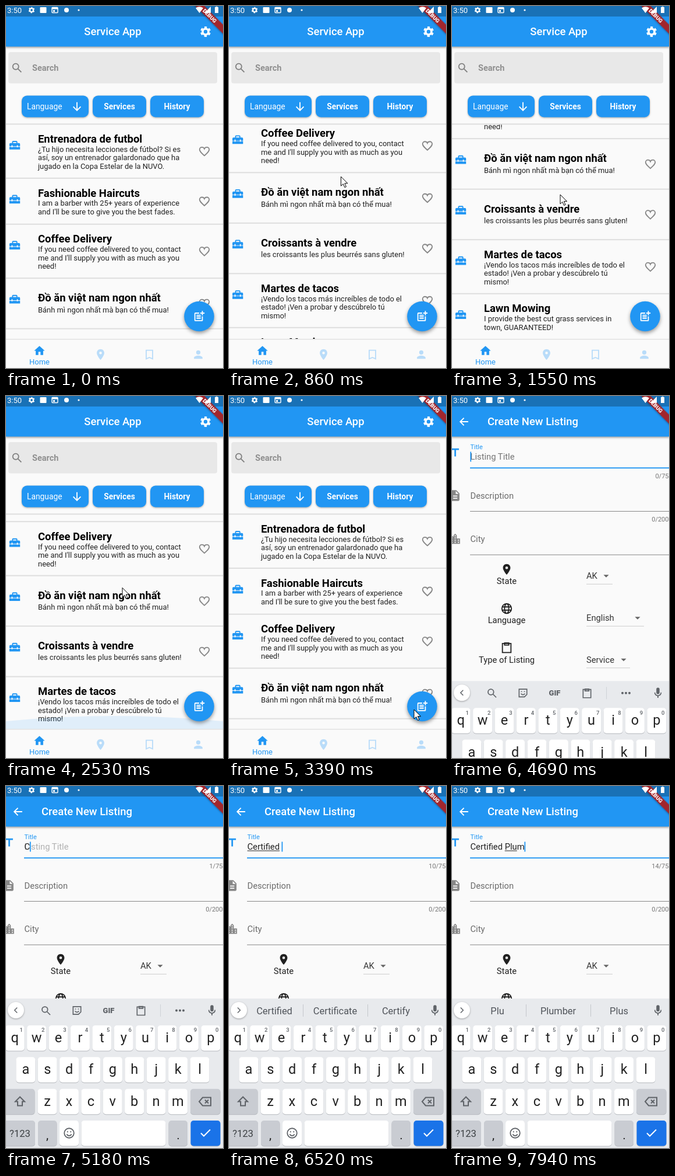
Write an HTML page that moves like this. It is 373 px wide and 620 px high and loops after 8 s.

```html
<!DOCTYPE html>
<html lang="en">
<head>
<meta charset="utf-8">
<title>Service App</title>
<style>
  html, body { margin: 0; width: 100%; height: 100%; overflow: hidden; background: #fafafa; }
  svg { display: block; width: 100vw; height: 100vh; }
  text { font-family: Roboto, sans-serif; white-space: pre; }
  .raised { filter: drop-shadow(0 1.5px 1.5px #0005); }
  .bar { filter: drop-shadow(0 2px 1.5px #0005); }
  .floating { filter: drop-shadow(0 3px 3px #0006); }
</style>
</head>
<body>
<svg id="stage" viewBox="0 0 373 620"></svg>
<script>
const LOOP = 8000, BLUE = '#2196f3', GREY = '#888', INK = '#212121', MAX_SCROLL = 239;

const FILLED = {
  home: 'M10 20v-6h4v6h5v-8h3L12 3 2 12h3v8z',
  place: 'M12 2C8.1 2 5 5.1 5 9c0 5.2 7 13 7 13s7-7.8 7-13c0-3.9-3.1-7-7-7zm0 9.5a2.5 2.5 0 0 1 0-5 2.5 2.5 0 0 1 0 5z',
  person: 'M12 12a4 4 0 1 0 0-8 4 4 0 0 0 0 8zM4 20v-2c0-2.7 5.3-4 8-4s8 1.3 8 4v2z',
  title: 'M5 4v3h5.5v12h3V7H19V4z',
  doc: 'M14 2H6a2 2 0 0 0-2 2v16a2 2 0 0 0 2 2h12a2 2 0 0 0 2-2V8zM16 18H8v-2h8zM16 14H8v-2h8zM13 9V3.5L18.5 9z',
  city: 'M15 11V5l-3-3-3 3v2H3v14h18V11zM7 19H5v-2h2zM7 15H5v-2h2zM7 11H5V9h2zM13 19h-2v-2h2zm0-4h-2v-2h2zm0-4h-2V9h2zm0-4h-2V5h2zm6 12h-2v-2h2zm0-4h-2v-2h2z',
  toolbox: 'M18 16h-2v-1H8v1H6v-1H2v5h20v-5h-4zM20 8h-3V6a2 2 0 0 0-2-2H9a2 2 0 0 0-2 2v2H4a2 2 0 0 0-2 2v4h4v-2h2v2h8v-2h2v2h4v-4a2 2 0 0 0-2-2zM15 8H9V6h6z',
  post: 'M17 19H5V7h7V5H5a2 2 0 0 0-2 2v12a2 2 0 0 0 2 2h12a2 2 0 0 0 2-2v-7h-2zM19 2h-2v3h-3v2h3v3h2V7h3V5h-3zM7 9h8v2H7zM7 12h8v2H7zM7 15h8v2H7z',
  mic: 'M12 14a3 3 0 0 0 3-3V5a3 3 0 0 0-6 0v6a3 3 0 0 0 3 3zM17 11a5 5 0 0 1-10 0H5.3a6.7 6.7 0 0 0 5.7 6.7V21h2v-3.3A6.7 6.7 0 0 0 18.7 11z',
  caret: 'M7 10l5 5 5-5z'
};
const STROKED = {
  heart: 'M12 19.9C6 14.5 3 11.8 3 8.5 3 6 5 4 7.5 4 9.4 4 11.3 5.2 12 7 12.7 5.2 14.6 4 16.5 4 19 4 21 6 21 8.5 21 11.8 18 14.5 12 19.9Z',
  search: 'M15 9.5a5.5 5.5 0 1 1-11 0a5.5 5.5 0 1 1 11 0M14 14l6 6',
  down: 'M12 4v15M5 12.5l7 7 7-7',
  back: 'M20 12H5M12 5l-7 7 7 7',
  bookmark: 'M6 4h12v16l-6-2.6L6 20z',
  globe: 'M21 12a9 9 0 1 1-18 0a9 9 0 1 1 18 0M16 12c0 5-2 9-4 9s-4-4-4-9 2-9 4-9 4 4 4 9M4 9h16M4 15h16',
  clipboard: 'M4 4h16v17H4zM8 3h8v4H8z',
  shift: 'M12 4l-8 8h4v7h8v-7h4z',
  backspace: 'M8 5h14v14H8l-6-7zM12 9l6 6M18 9l-6 6',
  check: 'M4 12l5 5L20 6',
  smile: 'M21 12a9 9 0 1 1-18 0a9 9 0 1 1 18 0M7.5 14a5 5 0 0 0 9 0M9 8.5v2M15 8.5v2',
  sticker: 'M4 4h16v11l-5 5H4zM8 13a4.5 4.5 0 0 0 8 0M9 8v2M15 8v2',
  left: 'M15 6l-6 6 6 6',
  right: 'M9 6l6 6-6 6'
};

// Text is placed by the middle of its capitals.
const text = (x, cy, size, str, fill = INK, weight = 400, anchor = 'start', extra = '') =>
  `<text x="${x}" y="${cy + size * .36}" font-size="${size}" fill="${fill}" font-weight="${weight}" text-anchor="${anchor}" ${extra}>${str}</text>`;
const rect = (x, y, w, h, fill, r = 0, extra = '') =>
  `<rect x="${x}" y="${y}" width="${w}" height="${h}" rx="${r}" fill="${fill}" ${extra}/>`;
const circle = (x, y, r, fill, extra = '') => `<circle cx="${x}" cy="${y}" r="${r}" fill="${fill}" ${extra}/>`;
const group = (id, body) => `<g id="${id}">${body}</g>`;
const icon = (name, cx, cy, color, size = 22, id = '') => {
  const paint = FILLED[name]
    ? `fill="${color}" fill-rule="evenodd"`
    : `fill="none" stroke="${color}" stroke-width="2"`;
  return `<path id="${id}" transform="translate(${cx - size / 2} ${cy - size / 2}) scale(${size / 24})" d="${FILLED[name] || STROKED[name]}" ${paint}/>`;
};
const gear = (cx, cy, size) => `<g transform="translate(${cx} ${cy}) rotate(-90) scale(${size / 24})" fill="none" stroke="#fff">
  <circle r="5.5" stroke-width="4"/><circle r="8" stroke-width="3.6" stroke-dasharray="4.6 3.778" stroke-dashoffset="2.3"/></g>`;
const appBar = () => rect(0, 0, 373, 69.5, BLUE, 0, 'class="bar"');

const LISTINGS = [
  ['Entrenadora de futbol', '¿Tu hijo necesita lecciones de fútbol? Si es', 'así, soy un entrenador galardonado que ha', 'jugado en la Copa Estelar de la NUVO.'],
  ['Fashionable Haircuts', 'I am a barber with 25+ years of experience', "and I'll be sure to give you the best fades."],
  ['Coffee Delivery', 'If you need coffee delivered to you, contact', "me and I'll supply you with as much as you", 'need!'],
  ['Đồ ăn việt nam ngon nhất', 'Bánh mì ngon nhất mà bạn có thể mua!'],
  ['Croissants à vendre', 'les croissants les plus beurrés sans gluten!'],
  ['Martes de tacos', '¡Vendo los tacos más increíbles de todo el', 'estado! ¡Ven a probar y descúbrelo tú', 'mismo!'],
  ['Lawn Mowing', 'I provide the best cut grass services in', 'town, GUARANTEED!']
];

function listings() {
  let top = 202.4;
  return LISTINGS.map(([title, ...lines]) => {
    const height = [86.5, 78.8, 92.5][lines.length - 1];
    const titleY = top + (lines.length === 1 ? 33.5 : 25);
    const bodyY = titleY + (lines.length === 1 ? 20.2 : 17.8);
    const item = icon('toolbox', 15, top + 36, BLUE) +
      text(55, titleY, 18.45, title, '#000', 700) +
      lines.map((line, i) => text(55, bodyY + i * 14.6, 12.93, line)).join('') +
      icon('heart', 341, top + height / 2 + .5, GREY) +
      rect(0, top + height - 1, 373, 2, '#dedede');
    top += height;
    return item;
  }).join('');
}

const button = (x, w, body) => rect(x, 153.5, w, 37, BLUE, 9, 'class="raised"') + body;

function home() {
  const pale = '#b9dcf9';
  return rect(0, 0, 373, 620, '#fafafa') +
    group('list', listings()) +
    '<path id="glow" d="M0 557Q186 539 373 557V571H0Z" fill="#2196f3"/>' +
    rect(0, 0, 373, 203, '#fafafa') + rect(0, 201.3, 373, 2, '#dedede') +
    appBar() + text(183.5, 43.6, 18.45, 'Service App', '#fff', 500, 'middle') + gear(343, 44, 22) +
    rect(4, 79, 359, 53.5, '#e8e8e8', 4) + icon('search', 19, 106, '#808080') +
    text(45, 106, 14.5, 'Search', '#8f8f8f', 700) +
    button(27, 115, text(36, 172, 13.8, 'Language', '#fff') + icon('down', 122, 172, '#fff')) +
    button(149, 92, text(195, 172, 13.8, 'Services', '#fff', 700, 'middle')) +
    button(248, 92, text(294, 172, 13.8, 'History', '#fff', 700, 'middle')) +
    rect(0, 570, 373, 2, '#e2e2e2') + rect(0, 571.5, 373, 49, '#fafafa') +
    icon('home', 57.5, 590.5, BLUE) + text(57.5, 609, 12.93, 'Home', BLUE, 400, 'middle') +
    icon('place', 162.5, 597, pale) + icon('bookmark', 246.5, 597, pale) + icon('person', 330.5, 597, pale) +
    circle(332, 531.5, 25.8, BLUE, 'class="floating"') + circle(332, 531.5, 25.8, '#fff', 'id="ripple"') +
    icon('post', 332, 531.5, '#fff');
}

const counter = (y, str, id) => text(372.5, y, 11, str, '#757575', 400, 'end', `id="${id}"`);
const picker = (iconName, label, labelY, value, valueY, width) =>
  icon(iconName, 94, labelY - 20, INK) + text(94, labelY, 14.75, label, INK, 400, 'middle') +
  text(231, valueY, 14.75, value, '#333') + icon('caret', 231 + width - 11, valueY, '#666') +
  rect(231, valueY + 13.7, width, 1, '#ccc');

function form() {
  return rect(0, 0, 373, 620, '#fafafa') + appBar() +
    icon('back', 20.5, 44, '#fff') + text(61, 43.6, 18.45, 'Create New Listing', '#fff', 500) +
    icon('title', 5.5, 97, GREY, 22, 'titleIcon') + icon('doc', 5.5, 170.5, GREY) + icon('city', 5.5, 245, GREY) +
    '<text id="label" x="31.5">Title</text>' +
    text(31.5, 104, 14.75, 'Listing Title', '#757575', 400, 'start', 'id="hint"') +
    text(31.5, 104, 14.75, '', INK, 400, 'start', 'id="typed"') +
    rect(0, 110.5, 0, 1, INK, 0, 'id="composing"') + rect(0, 95.5, 1.8, 17, BLUE, 0, 'id="textCaret"') +
    rect(31, 123, 342, 1, GREY, 0, 'id="titleLine"') + counter(137, '0/75', 'titleCount') +
    text(31.5, 171, 14.75, 'Description', '#6b6b6b') + rect(31, 197, 342, 1, GREY) + counter(211, '0/200', 'bodyCount') +
    text(31.5, 245, 14.75, 'City', '#6b6b6b') + rect(31, 271.5, 342, 1, GREY) +
    picker('place', 'State', 317, 'AK', 308, 45) +
    picker('globe', 'Language', 384, 'English', 380, 99) +
    picker('clipboard', 'Type of Listing', 451.2, 'Service', 451.5, 75) +
    rect(129, 502, 110, 46, '#fff', 2, 'class="raised"') +
    text(184, 525, 14.75, 'Add Listing!', BLUE, 500, 'middle');
}

function keyboard() {
  const soft = '#5f6368', dim = '#c9ccd2';
  const key = (x, y, w, fill = '#fff') => rect(x, y + 1, w, 43.5, '#b5b8bd', 5) + rect(x, y, w, 43.5, fill, 5);
  const row = (letters, x0, y) => [...letters].map((ch, i) => {
    const x = x0 + i * 37.4;
    return key(x - 16.5, y, 33) + text(x, y + 20.7, 23.5, ch, INK, 400, 'middle') +
      (y === 410 ? text(x + 11, 418, 9.5, (i + 1) % 10, soft, 500, 'middle') : '');
  }).join('');
  const tools = icon('left', 17, 384, soft, 18) + icon('search', 69, 385, soft, 21) + icon('sticker', 122, 384.5, soft, 20) +
    text(176.5, 384.5, 13, 'GIF', soft, 900, 'middle') + icon('clipboard', 232, 385, soft, 20) +
    rect(265, 374, 1, 21, '#cfd2d6') + [293, 299, 305].map(x => circle(x, 384.5, 2, soft)).join('');
  const words = icon('right', 17, 384, soft, 18) + rect(127, 374, 1, 21, '#c4c7cb') + rect(238, 374, 1, 21, '#c4c7cb') +
    [78, 182.5, 287].map(x => text(x, 385, 16.4, '', '#50545a', 400, 'middle', 'class="word"')).join('');
  return rect(0, 364, 373, 256, '#e8eaed') + circle(17, 384, 14, '#fff', 'class="raised"') +
    group('tools', tools) + group('words', words) + icon('mic', 354, 384.5, soft, 22) +
    row('qwertyuiop', 15.2, 410) + row('asdfghjkl', 33.8, 464.3) + row('zxcvbnm', 71, 518.7) +
    key(-4, 518.7, 53.5, dim) + icon('shift', 24, 540.5, soft, 24) +
    key(317, 518.7, 51.5, dim) + icon('backspace', 342, 540.5, soft, 24) +
    key(-4, 573, 54, dim) + text(24, 595, 16.6, '?123', '#3c4043', 400, 'middle') +
    key(55, 573, 32.5, dim) + text(71, 597, 21, ',', INK, 400, 'middle') +
    key(92, 573, 33) + icon('smile', 108.5, 594.5, soft, 22) +
    key(129.5, 573, 145) +
    key(279.5, 573, 32.5, dim) + text(296, 597, 21, '.', INK, 400, 'middle') +
    key(317.5, 573, 51, '#1a73e8') + icon('check', 343, 594.5, '#fff', 24);
}

function statusBar() {
  return rect(0, 0, 373, 18, '#1971b6') +
    `<g transform="translate(370 -3) rotate(45)">${rect(-60, 22.5, 120, 11, '#a3262c', 0, 'class="raised"')}${text(0, 28, 9.2, 'DEBUG', '#fff', 900, 'middle')}</g>` +
    text(2, 7.3, 13, '3:50', '#fff') + gear(44, 7, 13) + rect(58.5, 2, 11, 10, '#fff', 1) +
    rect(79, 2.5, 10, 9, 'none', 1, 'stroke="#fff" stroke-width="1.4"') + rect(79, 3, 10, 2.5, '#fff') + rect(81, 7, 3, 3, '#fff') +
    circle(104, 7, 4, '#fff') + circle(125, 7, 1.6, '#fff') +
    '<path fill="#fff" d="M326 3.5Q332.5-1 339 3.5L332.5 12zM352 1V12H341zM359 2h1.5V1h3v1H365V12H359z"/>';
}

document.getElementById('stage').innerHTML =
  home() + group('form', form()) + group('keyboard', keyboard()) + statusBar() +
  '<path id="pointer" d="M0 0V16L3.8 12.5 6.5 18.5 9 17.4 6.4 11.6H11.5Z" fill="#fff" stroke="#000"/>';

const el = id => document.getElementById(id);
const set = (id, attrs) => { for (const k in attrs) el(id).setAttribute(k, attrs[k]); };
const show = (id, on) => { el(id).style.display = on ? '' : 'none'; };
const progress = (t, from, to) => Math.min(1, Math.max(0, (t - from) / (to - from)));
const smooth = p => p * p * (3 - 2 * p);
const mix = (a, b, p) => a + (b - a) * p;

// [time, x, y]
const POINTER = [
  [250, 200, 520], [1150, 190, 219], [1380, 190, 219], [1550, 186, 323], [1850, 195, 534], [2170, 195, 248],
  [2280, 195, 248], [3070, 216, 585], [3100, 216, 585], [3390, 318, 537], [3680, 318, 537], [3930, 218.5, 335], [4420, 150, 103]
];
const TITLE = 'Certified Plum';
const KEY_TIMES = [5090, 5350, 5620, 5860, 6040, 6150, 6270, 6370, 6450, 6510, 6700, 6940, 7520, 7940];
// [time, start and end of the underlined word, suggestions]
const SUGGESTIONS = [
  [5270, 0, 1, 'C,Can,Call'], [5400, 0, 2, 'Ce,Center,Certain'], [5650, 0, 3, 'Cer,Certain,Certified'],
  [5890, 0, 4, 'Cert,Certified,Certificate'], [6080, 0, 5, 'Certi,Certified,Certificate'],
  [6300, 0, 7, 'Certifi,Certified,Certificate'], [6480, 0, 9, 'Certified,Certificate,Certify'],
  [6700, 0, 0, 'in,and,for'], [6940, 0, 0, 'P,Please,Plumber'], [7120, 10, 12, 'Pl,Place,Plumber'],
  [7700, 10, 13, 'Plu,Plumber,Plus']
];

function pointerAt(t) {
  const next = POINTER.findIndex(k => k[0] > t);
  if (next < 1) return POINTER[next ? POINTER.length - 1 : 0].slice(1);
  const [a, b] = [POINTER[next - 1], POINTER[next]];
  const p = smooth(progress(t, a[0], b[0]));
  return [mix(a[1], b[1], p), mix(a[2], b[2], p)];
}

function drawTitleField(t) {
  const focus = smooth(progress(t, 4460, 4660)), focused = t >= 4460;
  const count = KEY_TIMES.filter(k => k <= t).length;
  const typed = el('typed');
  typed.textContent = TITLE.slice(0, count);
  const width = count ? typed.getComputedTextLength() : 0;
  set('label', { y: mix(101.5, 91, focus), 'font-size': mix(14.75, 11, focus), fill: focused ? BLUE : '#6b6b6b' });
  set('hint', { opacity: focus * (1 - progress(t, 5090, 5290)) });
  set('titleLine', { y: focused ? 122.3 : 123, height: focused ? 1.9 : 1, fill: focused ? BLUE : GREY });
  set('titleIcon', { fill: focused ? BLUE : GREY });
  set('textCaret', { x: 31.3 + width });
  show('textCaret', focused);
  el('titleCount').textContent = count + '/75';

  const current = SUGGESTIONS.filter(s => s[0] <= t).pop();
  show('tools', !current);
  show('words', current);
  const [, start, end, words] = current || [0, 0, 0, ',,'];
  const before = start ? typed.getSubStringLength(0, start) : 0;
  set('composing', { x: 31.5 + before, width: end > start ? typed.getSubStringLength(start, end - start) : 0 });
  document.querySelectorAll('.word').forEach((w, i) => { w.textContent = words.split(',')[i]; });
}

function draw() {
  const t = performance.now() % LOOP;
  const [px, py] = pointerAt(t);
  const scroll = t < 2280 ? MAX_SCROLL * smooth(progress(t, 250, 1150))
    : t < 3070 ? Math.max(0, MAX_SCROLL - (py - 248)) : 0;
  set('list', { transform: `translate(0 ${-scroll})` });
  set('glow', { opacity: .12 * progress(t, 2280, 2340) * (1 - progress(t, 2650, 2900)) });
  set('ripple', { opacity: .22 * progress(t, 3610, 3680) * (1 - progress(t, 3700, 3960)) });
  set('pointer', { transform: `translate(${px} ${py})` });
  show('pointer', t >= 250 && t < 4470);

  const enter = progress(t, 3660, 3965);
  show('form', enter > 0);
  set('form', { opacity: enter ** 1.8, transform: `translate(0 ${155 * (1 - enter) ** 2.3})` });
  const rise = 1 - (1 - progress(t, 4600, 4900)) ** 2;
  show('keyboard', rise > 0);
  set('keyboard', { transform: `translate(0 ${256 * (1 - rise)})` });
  drawTitleField(t);
  requestAnimationFrame(draw);
}
draw();
</script>
</body>
</html>
```
